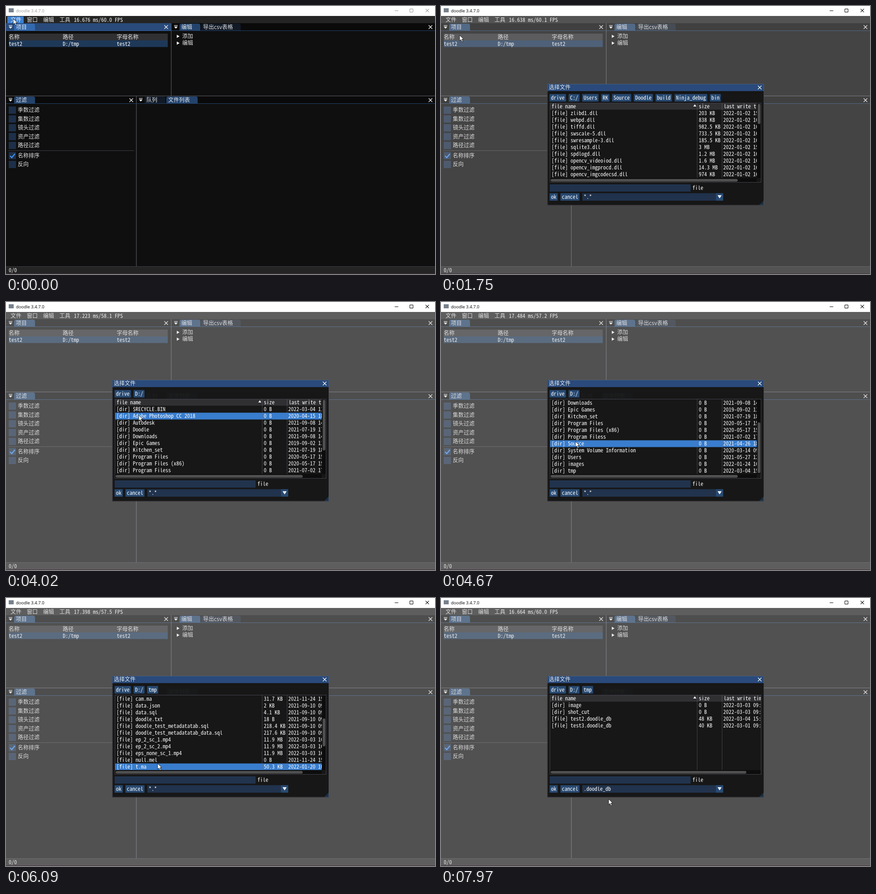
Recreate the animation shown at these times as an HTML page. Size 947 by 592 pixels, loop 8000 ms.

```html
<!DOCTYPE html>
<html lang="zh">
<head>
<meta charset="utf-8">
<title>doodle</title>
<style>
html, body { margin: 0; width: 100%; height: 100%; overflow: hidden; background: #0f0f0f; }
svg { display: block; width: 100%; height: 100%; }
text {
  font: 12px "Noto Sans Mono CJK SC", "Noto Sans Mono CJK JP", "Noto Sans CJK SC", "Noto Sans Mono", monospace;
  fill: #fff; white-space: pre;
}
text.han { font: 300 12px "Noto Sans CJK SC", "Noto Sans CJK JP", sans-serif; fill-opacity: .88; }
text.os { font: 9.5px "Open Sans", "Noto Sans", sans-serif; }
</style>
</head>
<body>
<svg id="stage" viewBox="0 0 947 592">
  <defs>
    <clipPath id="wide"><rect x="241" y="215" width="465" height="165"/></clipPath>
    <clipPath id="narrow"><rect x="241" y="215" width="456" height="165"/></clipPath>
  </defs>
  <g id="view"></g>
</svg>
<script>
const LOOP = 8000, STEP = 83.3;
const blue = a => `rgba(66,150,250,${a})`;
const FRAME = 'rgba(41,74,122,.54)', LINE = 'rgba(110,110,128,.5)', SPLIT = '#50505a';
const POPUP = 'rgba(20,20,20,.94)', TRACK = 'rgba(5,5,5,.53)';
const TAB = { focus: '#3369ad', on: '#23436c', off: '#121a26' };

// Times of hard changes
const MENU_OPEN = 240, MODAL = 1660, DRIVES = 3000, DISK = 3480, TMP = 5490, COMBO = 7230, PICK = 7820;

const pointer = [
  [0, 16, 28], [250, 16, 28], [600, 33, 50], [830, 41, 63], [1090, 41, 64], [1830, 41, 64.5],
  [1990, 52, 72], [2400, 230, 190], [2600, 312, 330], [2680, 316, 350], [2820, 272, 225],
  [2920, 258, 203], [3040, 258, 203], [3300, 292, 249], [4020, 293, 250], [4400, 295, 262],
  [5000, 299, 366], [5170, 300, 374], [5600, 300, 374], [5900, 316, 391], [6180, 345, 352],
  [6450, 360, 356], [6800, 392, 400], [6910, 395, 405], [7020, 396, 405], [7160, 428, 421],
  [7270, 426, 422], [7560, 378, 441], [7720, 370, 444], [LOOP, 370, 444]
];
const rates = [
  [0, '16.676 ms/60.0'], [410, '16.672 ms/60.0'], [920, '16.649 ms/60.1'], [1240, '16.672 ms/60.0'],
  [1660, '16.638 ms/60.1'], [2490, '16.667 ms/60.0'], [3240, '16.684 ms/59.9'], [3900, '17.223 ms/58.1'],
  [4650, '17.484 ms/57.2'], [5240, '17.223 ms/58.1'], [5560, '16.921 ms/59.1'], [6060, '17.398 ms/57.5'],
  [6320, '17.651 ms/56.7'], [7230, '16.668 ms/60.0'], [7810, '16.664 ms/60.0']
];
const scrolls = [[0, 0], [4150, 60], [4320, 74], [5740, 134], [6320, 194], [PICK, 0]];

const rows = s => s.trim().split('\n').map(r => r.trim().split('|'));
const binFiles = rows(`
  [file] zlibd1.dll|203 KB|2022-01-02 15:58
  [file] webpd.dll|838 KB|2022-01-02 16:04
  [file] tiffd.dll|982.5 KB|2022-01-02 16:04
  [file] swscale-5.dll|733.5 KB|2022-01-02 16:11
  [file] swresample-3.dll|185.5 KB|2022-01-02 16:11
  [file] sqlite3.dll|3 MB|2022-01-02 15:59
  [file] spdlogd.dll|1.2 MB|2022-01-02 16:02
  [file] opencv_videoiod.dll|1.6 MB|2022-01-02 16:16
  [file] opencv_imgprocd.dll|14.3 MB|2022-01-02 16:16
  [file] opencv_imgcodecsd.dll|974 KB|2022-01-02 16:16`);
const drives = rows(`
  [dir] C:/|0 B|2022-03-04 11:20
  [dir] D:/|0 B|2022-03-04 15:02`);
const disk = rows(`
  [dir] $RECYCLE.BIN|0 B|2022-03-04 11:20
  [dir] Adobe Photoshop CC 2018|0 B|2020-04-15 18:30
  [dir] Autodesk|0 B|2021-09-08 14:10
  [dir] Doodle|0 B|2021-07-19 17:41
  [dir] Downloads|0 B|2021-09-08 14:22
  [dir] Epic Games|0 B|2019-09-02 11:05
  [dir] Kitchen_set|0 B|2021-07-19 18:03
  [dir] Program Files|0 B|2020-05-17 15:12
  [dir] Program Files (x86)|0 B|2020-05-17 15:12
  [dir] Program Filess|0 B|2021-07-02 17:30
  [dir] Source|0 B|2021-04-26 18:44
  [dir] System Volume Information|0 B|2020-03-14 09:15
  [dir] Users|0 B|2021-05-27 12:00
  [dir] images|0 B|2022-01-24 16:20
  [dir] tmp|0 B|2022-03-04 15:02`);
const tmpFiles = rows(`
  [dir] image|0 B|2022-03-03 09:40
  [dir] shot_cut|0 B|2022-03-03 09:41
  [file] 1.csv|96 B|2022-03-02 11:20
  [file] 1.txt|12 B|2021-09-03 17:10
  [file] a.ma|48.2 KB|2022-01-20 10:31
  [file] a.mb|36 KB|2022-01-20 10:33
  [file] b.ma|50.1 KB|2022-01-20 10:36
  [file] cam.fbx|22.4 KB|2021-11-24 15:02
  [file] cam.ma|31.7 KB|2021-11-24 15:06
  [file] data.json|2 KB|2021-09-10 09:12
  [file] data.sql|4.1 KB|2021-09-10 09:14
  [file] doodle.txt|18 B|2021-09-10 09:20
  [file] doodle_test_metadatatab.sql|218.4 KB|2021-09-10 09:31
  [file] doodle_test_metadatatab_data.sql|217.6 KB|2021-09-10 09:33
  [file] ep_2_sc_1.mp4|11.9 MB|2022-03-03 16:10
  [file] ep_2_sc_2.mp4|11.9 MB|2022-03-03 16:12
  [file] eps_none_sc_1.mp4|11.9 MB|2022-03-03 16:15
  [file] null.mel|0 B|2021-11-24 15:40
  [file] t.ma|50.3 KB|2022-01-20 10:50
  [file] test.csv|124 B|2022-03-02 11:44
  [file] test2.doodle_db|48 KB|2022-03-04 15:02
  [file] test2.txt|7 B|2021-09-03 17:22
  [file] test3.doodle_db|40 KB|2022-03-01 09:18`);
const dbFiles = [tmpFiles[0], tmpFiles[1], tmpFiles[20], tmpFiles[22]];

// [start, breadcrumb, rows, total row count]
const folders = [
  [0, 'drive C:/ Users RK Source Doodle build Ninja_debug bin', binFiles, 39],
  [DRIVES, 'drive', drives, 2],
  [DISK, 'drive D:/', disk, 15],
  [TMP, 'drive D:/ tmp', tmpFiles, 28],
  [PICK, 'drive D:/ tmp', dbFiles, 4]
];

const at = (table, t) => table.filter(r => r[0] <= t).pop();
function place(t) {
  const i = Math.max(1, pointer.findIndex(p => p[0] > t));
  const [t0, x0, y0] = pointer[i - 1], [t1, x1, y1] = pointer[i];
  const k = (t - t0) / (t1 - t0);
  return [x0 + (x1 - x0) * k, y0 + (y1 - y0) * k];
}

const box = (x, y, w, h, fill, more = '') => `<rect x="${x}" y="${y}" width="${w}" height="${h}" fill="${fill}" ${more}/>`;
const frame = (x, y, w, h) => box(x + .5, y + .5, w - 1, h - 1, 'none', `stroke="${LINE}"`);
const text = (x, mid, s, more = '') =>
  `<text x="${x}" y="${mid + 4}" ${/[\u4e00-\u9fff]/.test(s) ? 'class="han"' : more}>${s}</text>`;
const shape = (d, fill = '#fff', more = '') => `<path d="${d}" fill="${fill}" ${more}/>`;
const stroke = (d, color = '#fff', w = 1) => shape(d, 'none', `stroke="${color}" stroke-width="${w}"`);
const cross = (x, y, r = 4, c = '#fff') => stroke(`M${x - r} ${y - r}l${2 * r} ${2 * r}m0 ${-2 * r}l${-2 * r} ${2 * r}`, c, 1.1);
const tab = (x, y, w, fill, label) =>
  shape(`M${x} ${y + 15}v-11q0-4 4-4h${w - 8}q4 0 4 4v11z`, fill) + text(x + 4, y + 7.5, label);
const dropIcon = (x, y) => box(x - 4, y - 4, 8, 1.2, '#fff') + shape(`M${x - 4} ${y - 1}h8l-4 4.5z`);

function titleBar(active) {
  const c = active ? '#000' : '#999';
  return box(0, 0, 947, 22, '#fff') + box(6, 5, 11, 9, '#76828c') +
    text(22, 9.5, 'doodle 3.4.7.0', `class="os" style="fill:${c}"`) +
    stroke('M858 10.5h8', c) + stroke('M891.5 6.5h7v7h-7z', c) + cross(930, 10, 3.7, c);
}

function panels(t) {
  const focus = t < MENU_OPEN;
  let s = box(0, 22, 947, 570, '#0f0f0f') + box(0, 22, 947, 16, '#242424');
  s += box(3, 23, 36, 15, t < MODAL ? blue(focus ? .8 : .31) : 'none');
  ['文件', '窗口', '编辑', '工具'].forEach((m, i) => s += text(10 + 36 * i, 30.5, m));
  s += text(150, 30.5, at(rates, t)[1] + ' FPS');

  s += box(0, 38, 364, 16, focus ? '#294a7a' : '#0a0a0a') + box(365, 38, 582, 16, '#0a0a0a');
  s += box(0, 199, 947, 16, '#0a0a0a');
  s += box(0, 54, 364, 1, focus ? TAB.focus : TAB.on) + box(365, 54, 582, 1, TAB.on) + box(0, 215, 947, 1, TAB.on);
  s += tab(18, 39, 46, focus ? TAB.focus : TAB.on, '项目') + tab(383, 39, 46, TAB.on, '编辑') +
    tab(431, 39, 87, TAB.off, '导出csv表格') + tab(18, 200, 46, TAB.on, '过滤') +
    tab(306, 200, 46, TAB.off, '队列') + tab(354, 200, 69, TAB.on, '文件列表');
  s += dropIcon(10, 46.5) + dropIcon(375, 46.5) + dropIcon(10, 207.5) + dropIcon(297.5, 207.5);
  s += cross(353.5, 46.5) + cross(937, 46.5) + cross(276.5, 208) + cross(937, 208);

  s += box(6, 61, 351, 15, '#303033') + box(6, 76, 351, 14.6, blue(.31));
  [['名称', 'test2'], ['路径', 'D:/tmp'], ['字母名称', 'test2']].forEach(([a, b], i) =>
    s += text(6 + 119.3 * i, 69, a) + text(6 + 119.3 * i, 84, b));
  ['添加', '编辑'].forEach((a, i) => s += shape(`M377 ${63.5 + 15 * i}v7l6-3.5z`) + text(389, 67 + 15 * i, a));

  ['季数过滤', '集数过滤', '镜头过滤', '资产过滤', '路径过滤', '名称排序', '反向'].forEach((a, i) => {
    const y = 230 + 19.5 * i + (i > 4 ? 3 : 0);
    s += box(6, y - 8, 16, 16, FRAME) + text(26, y, a);
  });
  s += stroke('M9 331l3.7 4 7-8.5', '#4296fa', 2.2);
  s += box(4, 319, 279, 1, LINE) + box(364, 38, 1.3, 160, SPLIT) + box(0, 198, 947, 1.3, SPLIT) +
    box(287, 199, 1.3, 376, SPLIT) + box(0, 575, 947, 1, LINE);
  return s + box(0, 576, 947, 16, '#242424') + text(6, 584, '0/0');
}

function fileMenu(cy) {
  let s = box(2, 38, 134, 138, POPUP) + frame(2, 38, 134, 138);
  [['新项目', 50], ['打开项目', 65.5], ['最近的项目', 80.5], ['保存', 98.5], ['调试', 116.5],
    ['样式设置', 131.5], ['关于', 146.5], ['退出', 164.5]].forEach(([a, y]) => {
    if (Math.abs(cy - y) < 7.5) s += box(5, y - 7.5, 128, 15, blue(.8));
    s += text(9, y, a);
  });
  [89, 107, 155].forEach(y => s += box(5, y, 128, 1, LINE));
  return s + shape('M122 76.5v8l7-4z') + text(74, 98.5, 'Ctrl+S', 'style="fill:#808080"');
}

function fileTable(list, count, scroll, cx, cy) {
  const tall = 15 * (count + 1), bar = tall > 166, right = bar ? 697 : 706;
  let s = `<g clip-path="url(#${bar ? 'narrow' : 'wide'})">` + box(241, 214 - scroll, 465, 15, '#303033') +
    text(244, 222 - scroll, 'file name') + text(569, 222 - scroll, 'size') + text(624, 222 - scroll, 'last write time') +
    shape(`M557 ${222 - scroll}h6.5l-3.25-5z`);
  list.forEach(([name, size, date], i) => {
    const y = 237 + 15 * i - scroll;
    if (y < 205 || y > 390) return;
    if (cx > 241 && cx < right && cy > 215 && cy < 380 && cy >= y - 7.5 && cy < y + 7.5)
      s += box(241, y - 7.5, 465, 15, blue(.8));
    s += text(244, y, name) + text(569, y, size) + text(623, y, date);
  });
  s += box(565, 215, 1, 165, LINE) + box(620, 215, 1, 165, LINE) + '</g>';
  s += box(241, 380, right - 241, 9, TRACK) + box(242, 382, bar ? 413 : 432, 6, '#4f4f4f', 'rx="3"');
  if (bar) {
    const len = 162 * 166 / tall;
    s += box(697, 215, 9, 165, TRACK) +
      box(699, 216 + (162 - len) * scroll / (tall - 166), 6, len, '#4f4f4f', 'rx="3"');
  }
  return s + frame(240, 214, 467, 176);
}

function dialog(t, cx, cy) {
  const [, crumbs, list, count] = at(folders, t);
  const over = (x, y, w, h) => cx >= x && cx < x + w && cy >= y && cy < y + h;
  const button = (x, y, label) => {
    const w = 6 * label.length + 6;
    return box(x, y, w, 16.5, blue(over(x, y, w, 16.5) ? 1 : .4)) + text(x + 3, y + 8.3, label);
  };
  let s = box(234.5, 172, 478.5, 268.5, POPUP) + box(234.5, 172, 478.5, 16, '#294a7a') +
    frame(234.5, 172, 478.5, 268.5) + text(238, 180, '选择文件') + cross(703.5, 180);
  let x = 239.7;
  crumbs.split(' ').forEach(c => { s += button(x, 194.5, c); x += 6 * c.length + 12; });
  s += fileTable(list, count, at(scrolls, t)[1], cx, cy);
  s += box(240, 394, 311, 16, FRAME) + text(555, 402, 'file') + button(239.7, 413.5, 'ok') + button(263.7, 413.5, 'cancel');
  const hot = over(312, 413, 311, 17) && t < PICK;
  s += box(312, 413.5, 295, 16.5, hot ? blue(.4) : FRAME) + box(607, 413.5, 16, 16.5, blue(hot ? 1 : .4)) +
    shape('M610.5 418h9l-4.5 7z') + text(315, 422, t < PICK ? '*.*' : '.doodle_db') +
    shape('M702 440h11v-11z', blue(.2));
  if (t >= COMBO && t < PICK) {
    s += box(312, 430, 311, 38, POPUP) + frame(312, 430, 311, 38);
    ['.doodle_db', '*.*'].forEach((a, i) => {
      const y = 434 + 15 * i, h = cy >= y && cy < y + 15;
      if (h || i) s += box(313, y, 309, 15, blue(h ? .8 : .31));
      s += text(315, y + 7.5, a);
    });
  }
  return s;
}

function cursor(t, x, y) {
  if (t > MODAL && x > 240 && x < 551 && y > 394 && y < 410) {
    const d = `M${x - 2.5} ${y - 6}h5m-2.5 0v12m-2.5 0h5`;
    return stroke(d, '#000', 2) + stroke(d, '#fff', 1);
  }
  return shape(`M${x} ${y}v12.5l2.9-2.7 2.3 5 2.2-1-2.3-4.8h4z`, '#fff', 'stroke="#000" stroke-width=".8"');
}

function scene(t) {
  const [x, y] = place(t);
  let s = panels(t);
  if (t >= MENU_OPEN && t < MODAL) s += fileMenu(y);
  if (t >= MODAL) {
    const dim = .35 * Math.min(1, (t - 1617) / 167);
    s += box(0, 22, 947, 570, `rgba(204,204,204,${dim})`) + dialog(t, x, y);
  }
  return s + box(0, 591, 947, 1, '#43303a') + titleBar(t >= MENU_OPEN) + cursor(t, x, y);
}

const view = document.getElementById('view');
const start = performance.now();
let shown = -1;
function tick() {
  const t = (performance.now() - start) % LOOP;
  const n = Math.floor((t + 20) / STEP);
  if (n !== shown) {
    shown = n;
    view.innerHTML = scene(Math.min(n * STEP, LOOP - 1));
  }
  requestAnimationFrame(tick);
}
tick();
</script>
</body>
</html>
```
